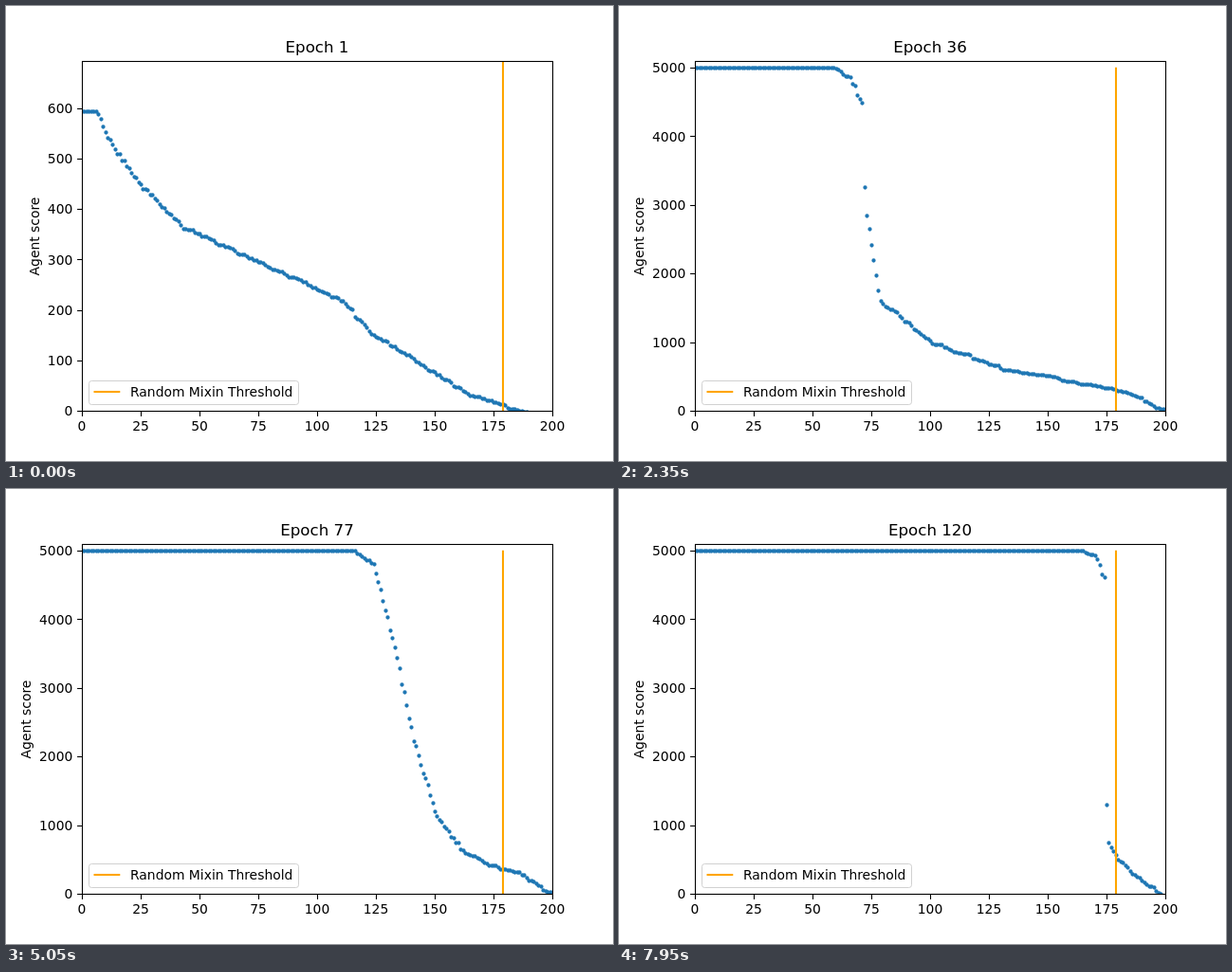
Write an HTML page that moves like this. It is 640 px wide and 480 px high and loops after 8 s.

```html
<!DOCTYPE html>
<html lang="en">
<head>
<meta charset="utf-8">
<title>Agent scores</title>
<style>
  html, body { margin: 0; width: 100%; height: 100%; overflow: hidden; background: #fff; }
  svg { display: block; width: 100vw; height: 100vh; }
  text { font: 13.889px "DejaVu Sans", sans-serif; fill: #000; }
  #title { font-size: 16.667px; }
  .mid { text-anchor: middle; }
  .end { text-anchor: end; }
  .axis { fill: none; stroke: #000; stroke-width: 1.1; }
  .limit { fill: none; stroke: orange; stroke-width: 2.08; }
  #dots { fill: none; stroke: #1f77b4; stroke-width: 4.3; stroke-linecap: round; }
</style>
</head>
<body>
<svg viewBox="0 0 640 480">
  <defs><clipPath id="area"><rect x="80" y="58" width="496" height="369"/></clipPath></defs>
  <rect width="640" height="480" fill="#fff"/>
  <g clip-path="url(#area)">
    <path id="dots"/>
    <path id="limit" class="limit"/>
  </g>
  <g id="xticks"></g>
  <g id="yticks"></g>
  <rect class="axis" x="80.5" y="58.5" width="496" height="369"/>
  <text id="title" class="mid" x="328" y="49"></text>
  <text id="label" class="mid">Agent score</text>
  <rect x="87.5" y="395.5" width="221" height="25" rx="2.8" fill="#fff" fill-opacity=".8" stroke="#ccc" stroke-opacity=".9"/>
  <path class="limit" d="M92.5 407H120.3"/>
  <text x="131" y="412">Random Mixin Threshold</text>
</svg>
<script>
const $ = id => document.getElementById(id);
const LOOP = 8000, AGENTS = 200, LEFT = 80, BASE = 427.2, HEIGHT = 369.6, STEP_X = 2.48;
const MAX_SCORE = 5000, THRESHOLD = 179;

// Score by rank at a few epochs: plateau end, shoulder, drop, foot, tail.
const END = [AGENTS, -20];
const keys = [];
const key = (epoch, ...knots) => keys.push({ epoch, knots: [...knots, END] });

key(1, [6, 594], [13, 525], [24, 453], [43, 364], [91, 262], [112, 214], [122, 156], [165, 32]);
key(12, [0, 1401], [9, 1206], [22, 1080], [69, 843], [106, 727], [137, 620], [169, 415], [192, 248]);
key(24, [53, 5000], [59, 4860], [63, 4350], [64, 2915], [71, 1838], [95, 1217], [121, 790], [186, 255]);
key(50, [112, 5000], [119, 4847], [123, 4598], [124, 3190], [128, 1341], [141, 720], [165, 430], [190, 280]);
key(66, [129, 5000], [135, 4929], [141, 4050], [152, 2600], [161, 1010], [169, 670], [177, 480], [189, 330]);
key(89, [132, 5000], [141, 4680], [150, 2980], [151, 1893], [158, 1300], [167, 680], [174, 430], [190, 250]);
key(120, [165, 5000], [170, 4929], [174, 4598], [175, 1272], [176, 789], [179, 541], [184, 389], [192, 127]);

const lerp = (a, b, w) => a + (b - a) * w;
const rand = n => { const s = Math.sin(n * 12.9898) * 43758.5453; return s - Math.floor(s); };

function knotsFor(epoch) {
  const j = Math.max(1, keys.findIndex(k => k.epoch >= epoch));
  const a = keys[j - 1], b = keys[j];
  const w = (epoch - a.epoch) / (b.epoch - a.epoch);
  const knots = a.knots.map(([x, y], n) => [lerp(x, b.knots[n][0], w), lerp(y, b.knots[n][1], w)]);

  // Between keys the plateau falls back by a random amount.
  const setback = w > 0 && w < 1 && epoch > 24 ? rand(epoch) * (epoch < 92 ? 22 : 48) : 0;
  const top = knots[0][0];
  return knots.map(([x, y]) => [x - setback * (AGENTS - x) / (AGENTS - top), y]);
}

function scoreAt(knots, x) {
  const j = knots.findIndex(k => k[0] >= x);
  if (j === 0) return knots[0][1];
  const [x0, y0] = knots[j - 1], [x1, y1] = knots[j];
  return lerp(y0, y1, (x - x0) / (x1 - x0));
}

// Noisy scores, ranked best first.
function scoresFor(epoch) {
  const knots = knotsFor(epoch), [top, best] = knots[0];
  return Array.from({ length: AGENTS }, (_, i) => {
    const noise = i > top ? best * .016 * (rand(epoch * AGENTS + i) - .5) : 0;
    return Math.min(best, scoreAt(knots, i) + noise);
  }).sort((a, b) => b - a);
}

function tickStep(range) {
  const raw = range / 9, unit = 10 ** Math.floor(Math.log10(raw));
  return unit * [1, 2, 2.5, 5, 10].find(m => m * unit >= raw);
}

const snap = v => Math.floor(v + .5) + .5;

function draw(epoch) {
  const scores = scoresFor(epoch);
  const limit = scores[0] + 100, step = tickStep(limit);
  const yOf = v => BASE - HEIGHT * v / limit;

  $('dots').setAttribute('d', scores.map((v, i) =>
    `M${snap(LEFT + STEP_X * i)} ${snap(yOf(v))}h.01`).join(''));
  $('limit').setAttribute('d', `M${Math.round(LEFT + STEP_X * THRESHOLD)} ${BASE}V${yOf(MAX_SCORE).toFixed(2)}`);

  let ticks = '';
  for (let v = 0; v <= limit; v += step) {
    const y = yOf(v);
    ticks += `<path class="axis" d="M80 ${snap(y)}h-4.9"/><text class="end" x="70.3" y="${Math.round(y + 5.2)}">${v}</text>`;
  }
  $('yticks').innerHTML = ticks;
  $('title').textContent = 'Epoch ' + epoch;
  $('label').setAttribute('transform', `translate(${limit < 1000 ? 35 : 26} 243) rotate(-90)`);
}

let xTicks = '';
for (let n = 0; n <= AGENTS; n += 25) {
  const x = LEFT + STEP_X * n;
  xTicks += `<path class="axis" d="M${snap(x)} 428v4.9"/><text class="mid" x="${x}" y="448">${n}</text>`;
}
$('xticks').innerHTML = xTicks;

// 15 epochs per second, snapped to 50 ms slots.
function epochAt(t) {
  const slot = Math.floor(t / 50);
  return 1 + 3 * Math.floor(slot / 4) + [0, 1, 1, 2][slot % 4];
}

let shown = 0, start = null;
function tick(now) {
  if (start === null) start = now;
  const epoch = epochAt(Math.max(0, now - start) % LOOP);
  if (epoch !== shown) draw(shown = epoch);
  requestAnimationFrame(tick);
}
draw(shown = 1);
requestAnimationFrame(tick);
</script>
</body>
</html>
```
